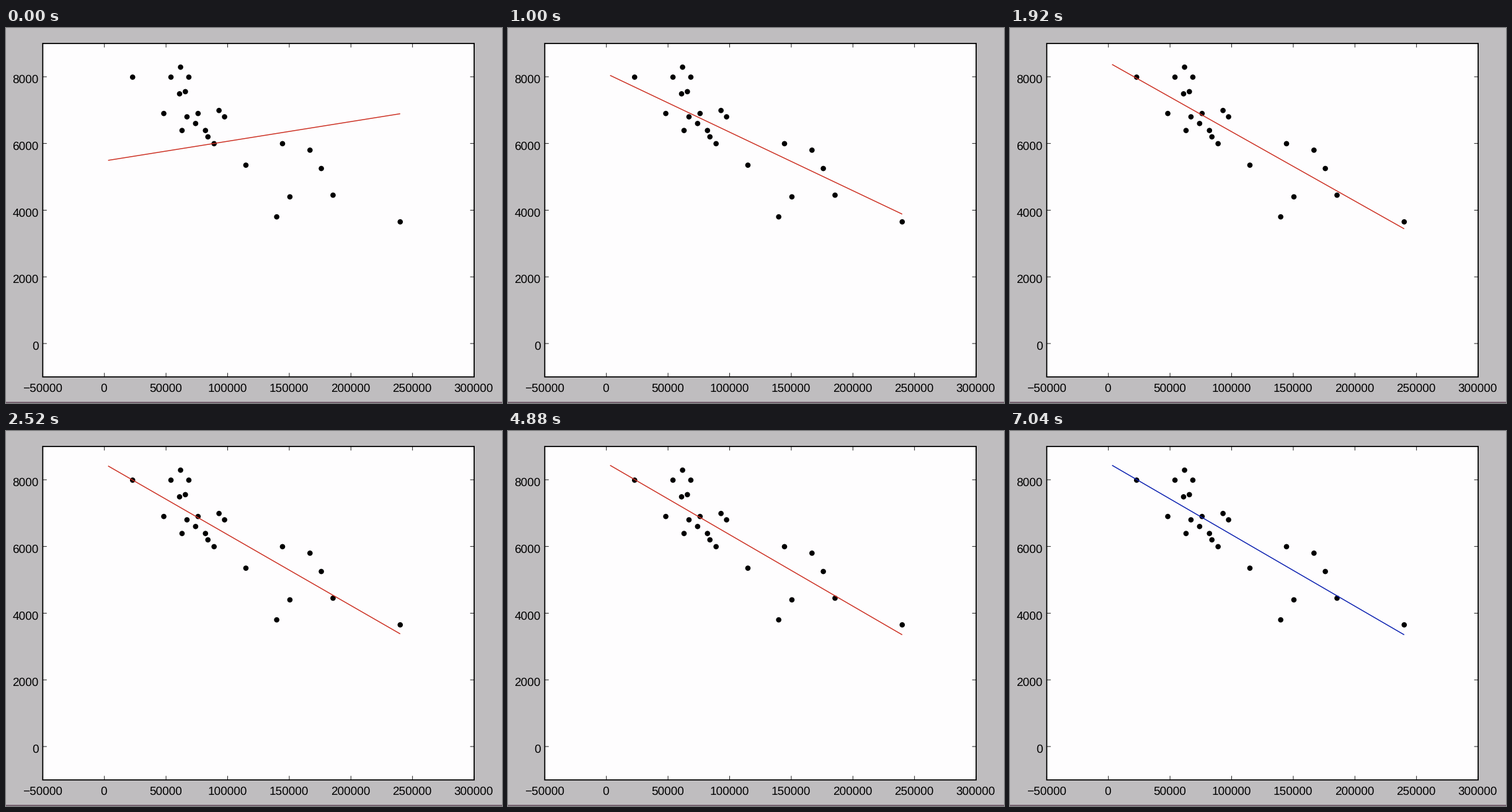
A matplotlib script for the animation above (7080 ms loop, 800 px wide and 606 px high).

```python
import numpy as np
import matplotlib.pyplot as plt
from matplotlib.animation import FuncAnimation
from matplotlib.patches import Circle, Rectangle

W, H, DPI = 800, 606, 100
FRAMES, STEP = 177, 40
PX = 72 / DPI  # points per pixel
LEFT, RIGHT, TOP, BOTTOM = 59.3, 755.1, 25, 563.8

RED, BLUE = "#cc2f22", "#0a1fb0"
BLUE_FROM = 6120  # ms

# price: mileages in thousands
SALES = {
    3650: [240], 3800: [139.8], 4400: [150.5], 4450: [185.5], 5250: [176],
    5350: [114.8], 5800: [166.8], 5995: [89, 144.5], 6200: [84],
    6390: [63, 82], 6600: [74], 6800: [67, 97.5], 6900: [48.2, 76],
    6990: [93], 7490: [61], 7555: [65.7], 7990: [22.9, 54, 68.5],
    8290: [61.8],
}
km, price = np.array([(1000 * k, p) for p, ks in SALES.items() for k in ks]).T

plt.rcParams["text.hinting"] = "none"
fig = plt.figure(figsize=(W / DPI, H / DPI), dpi=DPI, facecolor="#bfbdbf")
ax = fig.add_axes([0, 0, 1, 1])
ax.set_xlim(0, W)
ax.set_ylim(H, 0)
ax.axis("off")


def x_pos(value):
    return LEFT + (value + 50000) / 350000 * (RIGHT - LEFT)


def y_pos(value):
    return BOTTOM - (value + 1000) / 10000 * (BOTTOM - TOP)


def stroke(xs, ys, width=0.9, color="black", **kw):
    return ax.plot(xs, ys, lw=width * PX, color=color, snap=False, **kw)[0]


def label(x, y, value, align):
    ax.text(x, y, str(value).replace("-", "\u2212"), ha=align, va="baseline",
            size=19 * PX, family="Liberation Sans", color="black")


ax.add_patch(Rectangle((LEFT, TOP), RIGHT - LEFT, BOTTOM - TOP, fc="#fefdfe",
                       ec="black", lw=1.8 * PX, snap=False, zorder=1))
ax.add_patch(Rectangle((0, 604), W, 2, fc="#75626f", lw=0))

for value in range(-50000, 300001, 50000):
    x = x_pos(value)
    for edge, inward in ((TOP, 6), (BOTTOM, -6)):
        stroke([x, x], [edge, edge + inward])
    label(x - 0.7, 588, value, "center")

for value in range(0, 8001, 2000):
    y = y_pos(value)
    for edge, inward in ((LEFT, 6), (RIGHT, -6)):
        stroke([edge, edge + inward], [y, y])
    label(52.5, y + 10, value, "right")

for x, y in zip(x_pos(km), y_pos(price)):
    ax.add_patch(Circle((x, y), 4.3, fc="black", lw=0, zorder=3))

# The fit descends from a rough guess to the least squares line
best_slope = np.polyfit(km, price, 1)[0]
best_level = price.mean()
START_SLOPE, START_LEVEL = 0.0059, 6073
ends = np.array([3000, km.max()])
fit = stroke([], [], 1.5, RED, zorder=4, solid_capstyle="butt")


def approach(start, goal, rate, t):
    return goal + (start - goal) * np.exp(-rate * t)


def update(i):
    t = i * STEP
    slope = approach(START_SLOPE, best_slope, 0.00195, t)
    level = approach(START_LEVEL, best_level, 0.0032, t)
    fit.set_data(x_pos(ends), y_pos(level + slope * (ends - km.mean())))
    fit.set_color(BLUE if t >= BLUE_FROM else RED)
    return [fit]


anim = FuncAnimation(fig, update, frames=FRAMES, interval=STEP,
                     repeat=True, repeat_delay=0, blit=False)
plt.show()
```
